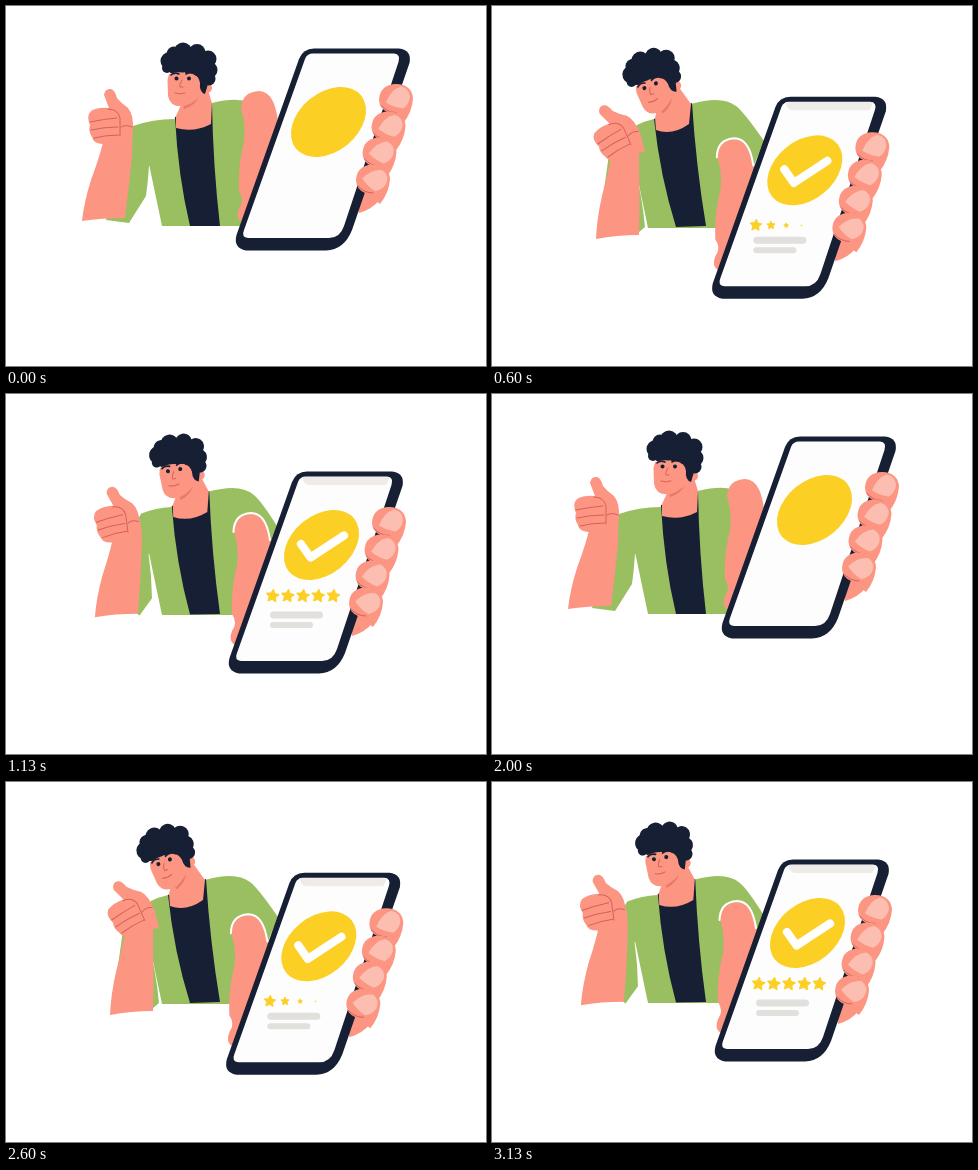
These frames come from a looping animation (480 px wide and 360 px high, 4.07 s). An HTML page:

```html
<!DOCTYPE html>
<html lang="en">
<head>
<meta charset="utf-8">
<title>Thumbs up with phone</title>
<style>
  html, body { margin: 0; width: 100%; height: 100%; overflow: hidden; background: #fff; }
  svg { display: block; width: 100vw; height: 100vh; }
  .skin { fill: #fc9582; }
  .green { fill: #9abf61; }
  .navy { fill: #161f33; }
  .yellow { fill: #fccf25; }
  .grey { fill: #e2e0dc; }
  .nail { fill: #fcbeb0; }
  .crease { fill: none; stroke: #d9605a; stroke-width: 1; stroke-linecap: round; }
  .ink { fill: none; stroke: #161f33; stroke-width: 1.6; stroke-linecap: round; }
  .white { fill: none; stroke: #fff; stroke-linecap: round; stroke-linejoin: round; }
</style>
</head>
<body>
<svg viewBox="0 0 480 360">
  <path id="sleeve" class="green"/>
  <path id="body" class="green"/>
  <path id="shirt" class="navy"/>
  <path id="neck" class="skin"/>
  <g id="head">
    <circle class="skin" cx="201" cy="82" r="5"/>
    <g id="hair" class="navy"></g>
    <path d="M177 97 L193 90 Q190 99 178 103Z" fill="#ea7767"/>
    <path class="skin" d="M163 68 Q172 65 180 67 L196 68 L199 84 Q191 96 179 100 Q164 102 162 90 L161.500 74Z"/>
    <path class="navy" d="M189 64 L205 64 L202 78 L199 88 Q193 86 194 77 Q193 71 189 69Z"/>
    <path class="ink" d="M165 69 Q168 66 173 68 M180 68 Q185 65 190 69"/>
    <circle class="navy" cx="170.500" cy="72.500" r="2"/>
    <circle class="navy" cx="183" cy="72.500" r="2"/>
    <path class="crease" d="M176 74 Q173 79 174 81 L177 81 M169 87 Q174 89 179 87"/>
  </g>
  <path id="forearm" class="skin"/>
  <g id="fist">
    <path class="skin" d="M98 89 Q99 82 105 83 Q109 84 111 92 Q115 97 122 102 Q128 109 127 125 L124 142 L96 138 Q87 137 86 131 Q82 125 84 119 Q80 110 85 105 Q92 101 103 102 Q100 94 98 89Z"/>
    <path class="crease" d="M84 116 Q98 113 111 112 M85 124 Q98 121 112 121 M88 132 Q100 129 113 129 M102 103 Q112 103 114 112 V130 M115 121 Q120 118 126 121"/>
  </g>
  <g id="device">
    <path class="skin" d="M266 162 Q264 120 246 120 Q229 121 228 137 Q235 160 229 180 Q225 200 226 220 Q232 229 226 237 Q222 247 229 251 L270 200Z"/>
    <path id="rim" class="white" stroke-width="2" d="M227.500 138 Q228 120 245 119 Q260 119 264 146"/>
    <path class="skin" d="M340 205 L374 206 Q373 234 346 242Z"/>
    <path class="navy" d="M301 77.500 H386 Q399 79 396.500 92 L339 259 Q331 279 313 279.500 H233 Q220 277 223.500 264 L286 88 Q290 77.500 301 77.500Z"/>
    <path fill="#fdfdfd" d="M300 82.500 H381 Q388 83 385.500 91 L331 255 Q327 267 316 267 H235 Q228 266 231 259 L292 88 Q294 82.500 300 82.500Z"/>
    <path id="notch" fill="#eeebe8" d="M296 83 H384 L380 91 H303 Q298 91 296 83Z"/>
    <ellipse class="yellow" rx="42" ry="29.500" transform="translate(315.500 151) rotate(-39)"/>
    <path id="check" class="white" stroke-width="8.200" pathLength="100" d="M295 150 L304.500 163.500 L338 141.500"/>
    <g id="stars" class="yellow"></g>
    <rect id="line0" class="grey" x="264" y="217.500" height="7" rx="3.500"/>
    <rect id="line1" class="grey" x="264" y="228" height="6" rx="3"/>
    <g id="fingers"></g>
  </g>
</svg>
<script>
const $ = id => document.getElementById(id);
const LOOP = 4070, REPEAT = 2000, STEP = 200 / 3, LAST = 17;

// Each limb is defined upright and leaning; the lean value blends the two.
const limbs = {
  sleeve: [
    'M127 120 Q147 113 168 113 L171 160 L143 160 Q142 176 140 190 L123 217 L100 214 L118 150Z',
    'M145 119 Q153 115 162 113 L170 160 L142 160 Q150 188 153 221 L146 227 L112 184 L117 148Z'],
  body: [
    'M169 112 L143 158 L156 220 H240 L271 131 Q257 106 250 101 Q238 89 206 97Z',
    'M162 113 L143 160 L156 222 H236 L272 135 Q252 106 244 100 Q230 89 199 98Z'],
  shirt: [
    'M169 111 L206 97 Q207 160 214 220 L184 220 Q172 170 169 111Z',
    'M162 113 L200 97 Q204 160 214 220 L184 221 Q168 170 162 113Z'],
  neck: [
    'M176 97 L202 84 L206 97 L205 118 Q188 127 170 122 L170 110Z',
    'M166 100 L186 80 L199 98 L197 118 Q180 130 164 124 L163 112Z'],
  forearm: [
    'M76 215 Q78 196 85 174 Q95 147 98 132 L125 120 Q127 125 126 150 Q123 180 119 212 Q95 212 76 215Z',
    'M104 233 Q105 212 110 190 Q116 168 120 146 L142 130 Q148 140 147 160 Q148 200 147 229 Q125 229 104 233Z']
};

const clamp = x => Math.max(0, Math.min(1, x));
const ramp = (t, from, to) => clamp((t - from) / (to - from));
const ease = (t, from, to) => (1 - Math.cos(Math.PI * ramp(t, from, to))) / 2;

function blend([a, b], u) {
  const ends = b.match(/[\d.]+/g);
  let i = 0;
  return a.replace(/[\d.]+/g, n => (+n + (ends[i++] - n) * u).toFixed(2));
}

function add(parent, markup) {
  parent.insertAdjacentHTML('beforeend', markup);
  return parent.lastElementChild;
}

[[163.5, 55, 9], [161, 62, 5], [168, 48, 7.5], [177, 45.5, 9], [191, 46.5, 8.5], [202, 53, 8.5],
 [203, 64, 8.5], [203, 73, 6.5], [187, 58, 12], [171, 58, 11]]
  .forEach(([x, y, r]) => add($('hair'), `<circle cx="${x}" cy="${y}" r="${r}"/>`));

// Every finger tapers down and is overlapped by the next one.
[[383, 127.5, 0], [375.5, 155, 7], [366.5, 181, 14], [360, 208, 25]].forEach(([x, y, turn]) =>
  add($('fingers'), `<g transform="translate(${x} ${y})">
    <path class="skin" d="M-17 1 Q-16 -14 0 -14.500 Q16 -14 17 0 Q16 14 7 25 L-8 14 Q-17 10 -17 1Z"/>
    <path class="crease" d="M-15 7 Q-9 14 0 14"/>
    <path class="nail" transform="rotate(${turn})" d="M-10 4 Q-5 -9 5 -12 Q14 -10 14 -1 Q13 6 7 10 Q-2 9 -10 4Z"/></g>`));

const starPoints = Array.from({ length: 10 }, (_, i) => {
  const r = i % 2 ? 3.4 : 6.8, a = Math.PI * (i / 5 - 0.46);
  return (r * Math.cos(a)).toFixed(2) + ',' + (r * Math.sin(a)).toFixed(2);
}).join(' ');
const stars = Array.from({ length: 5 }, () =>
  add($('stars'), `<polygon points="${starPoints}" stroke="#fccf25" stroke-linejoin="round"/>`));

function draw(t) {
  const lean = ease(t, 0, 530) - 0.54 * ease(t, 590, 960);
  const swing = ease(t, 0, 450) - 0.68 * ease(t, 590, 960);
  const drop = 63 * ease(t, 0, 405) - 28 * ease(t, 425, 765);

  for (const id in limbs) $(id).setAttribute('d', blend(limbs[id], lean));
  $('head').setAttribute('transform',
    `translate(${-24.5 * lean} ${6 * lean}) rotate(${-22 * lean} 183 58)`);
  $('fist').setAttribute('transform',
    `translate(${25 * swing} ${9 * clamp(2 * lean)}) rotate(${-24 * swing} 113 130)`);
  $('device').setAttribute('transform', `translate(${-0.2 * (drop - 35)} ${drop - 35})`);

  $('rim').setAttribute('opacity', clamp(drop / 20));
  $('notch').setAttribute('opacity', ramp(t, 60, 260));
  const drawn = ease(t, 40, 265);
  $('check').setAttribute('stroke-dasharray', `${100 * drawn} 200`);
  $('check').setAttribute('visibility', drawn > 0 ? 'visible' : 'hidden');
  $('line0').setAttribute('width', 53 * ease(t, 290, 520));
  $('line1').setAttribute('width', 43 * ease(t, 340, 570));

  stars.forEach((star, i) => {
    const size = ramp(t, 365 + 66 * i, 625 + 66 * i);
    const rise = 4 * (1 - ease(t, 590, 800));
    star.setAttribute('transform',
      `translate(${266.5 + 15.2 * i} ${202 + rise}) scale(${size}) rotate(${-25 * (1 - size)})`);
  });
}

// The motion advances in fifteenths of a second, then holds its last pose.
function frame(now) {
  const loopTime = now % LOOP;
  const t = loopTime < REPEAT ? loopTime : loopTime - REPEAT;
  draw(Math.min(LAST, Math.floor((t + 3.5) / STEP)) * STEP);
}

const start = performance.now();
function tick() {
  frame(performance.now() - start);
  requestAnimationFrame(tick);
}
tick();
</script>
</body>
</html>
```
